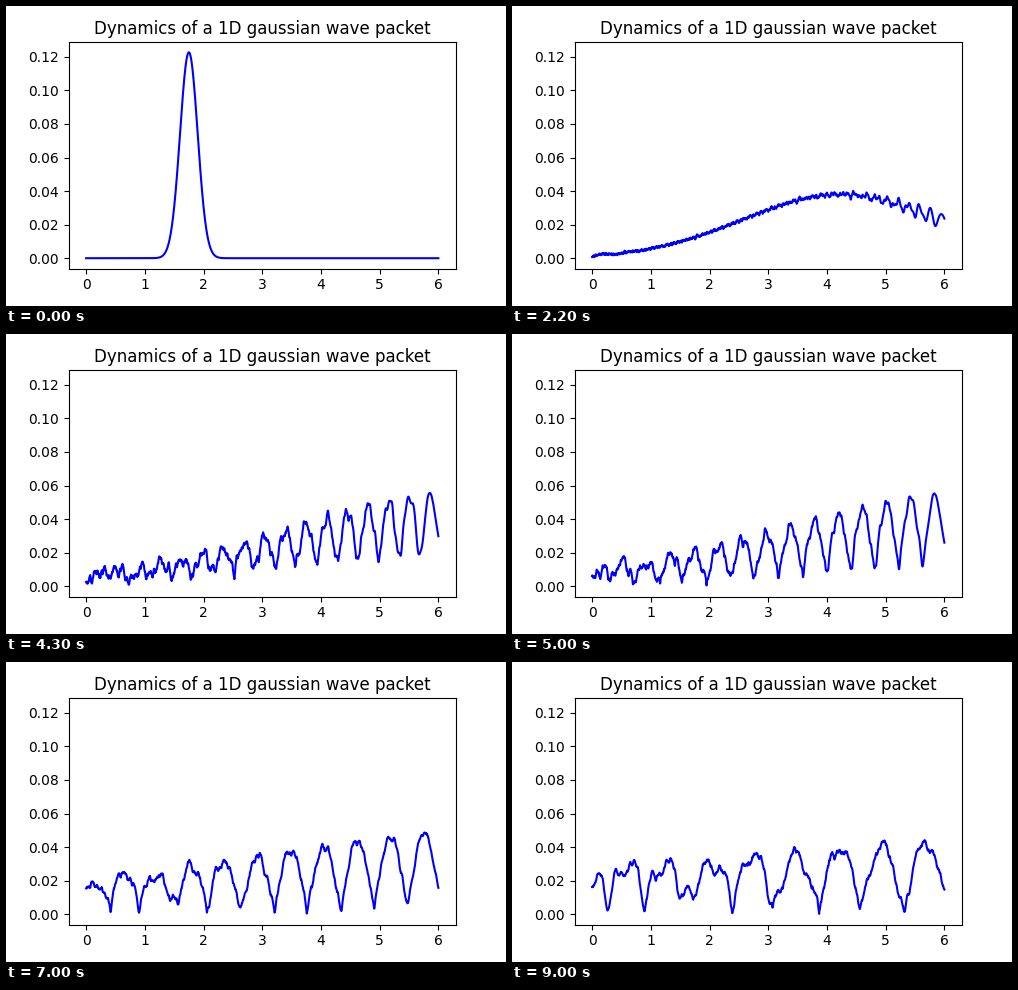
Recreate the animation shown at these times as a matplotlib script. Size 500 by 300 pixels, loop 9.1 s.

```python
import numpy as np
import matplotlib.pyplot as plt
from matplotlib.animation import FuncAnimation

FRAMES = 91
INTERVAL = 100      # ms per drawn frame
STEP_MS = 70        # ms per simulation step

# Natural units, hbar = m = 1
STEPS = 129
DT = 1 / STEPS
X0, K0, SIGMA = 1.75, 10.0, 0.15
N = 1500

x = np.linspace(0, 6, N)


def normalize(psi):
    return psi / np.sqrt(np.sum(np.abs(psi) ** 2))


def propagator(dt):
    """Free-particle kernel between all pairs of grid points."""
    dx = x[1] - x[0]
    row = np.sqrt(1 / (2j * np.pi * dt)) * np.exp(0.5j * x**2 / dt) * dx
    i = np.arange(N)
    return row[np.abs(i[:, None] - i)]


def evolve():
    """Packet modulus after every step; what leaves the grid is lost."""
    kernel = propagator(DT)
    psi = normalize(np.exp(-(x - X0) ** 2 / (2 * SIGMA**2) + 1j * K0 * x))
    states = [np.abs(psi)]
    for _ in range(STEPS):
        psi = normalize(kernel @ psi)
        states.append(np.abs(psi))
    return states


states = evolve()

plt.rcParams["font.family"] = "DejaVu Sans"
fig, ax = plt.subplots(figsize=(5, 3), dpi=100)
fig.subplots_adjust(left=0.125, right=0.9, bottom=0.125, top=0.88)
line, = ax.plot(x, states[0], color="blue", lw=1.5)
ax.set_title("Dynamics of a 1D gaussian wave packet")
ax.set_xlim(ax.get_xlim())
ax.set_ylim(ax.get_ylim())


def update(i):
    step = int((i + 0.5) * INTERVAL / STEP_MS)
    line.set_ydata(states[step])
    return line,


anim = FuncAnimation(fig, update, frames=FRAMES, interval=INTERVAL,
                     repeat=True, repeat_delay=0)
plt.show()
```
